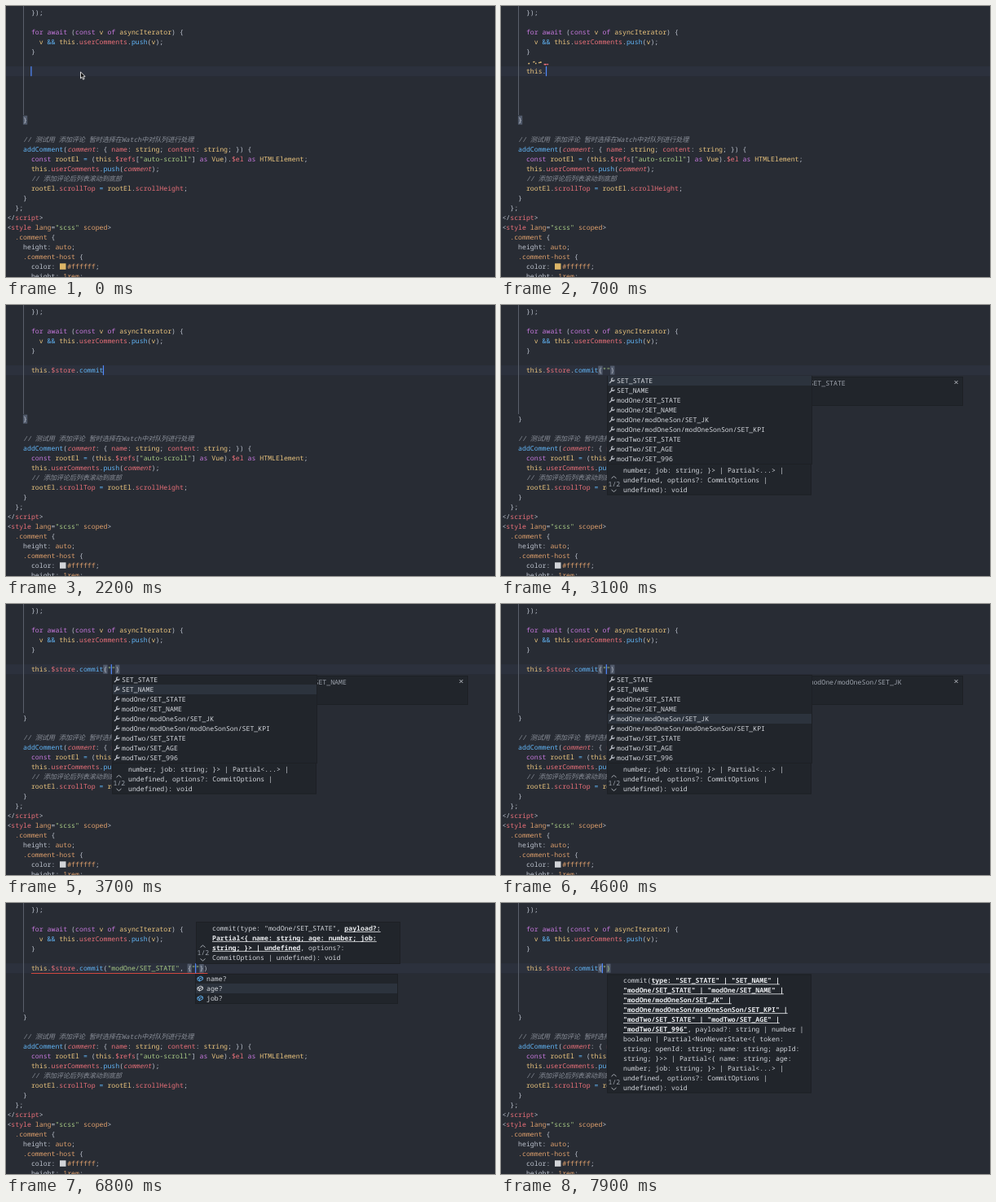
These frames come from a looping animation (600x333 px, 8 s). An HTML page with a canvas:

```html
<!DOCTYPE html>
<html lang="zh">
<head>
<meta charset="utf-8">
<style>
html, body { margin: 0; width: 100%; height: 100%; overflow: hidden; background: #282c34; }
canvas { display: block; width: 600px; height: 333px; }
</style>
</head>
<body>
<canvas id="stage" width="600" height="333"></canvas>
<script>
const g = document.getElementById('stage').getContext('2d');
const LOOP = 8000, CHAR = 4.92, WIDE = 8, LEFT = 1.4, ROW = 12;
const colX = col => LEFT + CHAR * col;
const rowY = row => 8.2 + ROW * row;

// One-letter tags used in marked-up text: `tag followed by its run of characters.
const COLORS = {
  w: '#bcc2cd', p: '#c678dd', o: '#dfa06c', y: '#ebc57e', r: '#ea7079', i: '#ea7079', b: '#61b4f5',
  g: '#a9cb85', c: '#8a8f99', n: '#d2d5db', d: '#9ca2ac', B: '#eceef1', M: '#f2f3f5'
};

const CODE = [
  [0, 6, '`w});'],
  [2, 6, '`pfor await `w(`pconst `yv `pof `yasyncIterator`w) {'],
  [3, 8, '`yv `b&& `ythis`w.`ruserComments`w.`bpush`w(`yv`w);'],
  [4, 6, '`w}'],
  [11, 4, '`w}'],
  [13, 4, '`c// 测试用 添加评论 暂时选择在Watch中对队列进行处理'],
  [14, 4, '`baddComment`w(`icomment`w: { `rname`w: `ystring`w; `rcontent`w: `ystring`w; }) {'],
  [15, 6, '`pconst `yrootEl `b= `w(`ythis`w.`r$refs`w[`g"auto-scroll"`w] `pas `yVue`w).`r$el `pas `yHTMLElement`w;'],
  [16, 6, '`ythis`w.`ruserComments`w.`bpush`w(`icomment`w);'],
  [17, 6, '`c// 添加评论后列表滚动到底部'],
  [18, 6, '`yrootEl`w.`rscrollTop `b= `yrootEl`w.`rscrollHeight`w;'],
  [19, 4, '`w}'],
  [20, 2, '`w};'],
  [21, 0, '`w</`rscript`w>'],
  [22, 0, '`w<`rstyle `olang`w=`g"scss" `oscoped`w>'],
  [23, 2, '`o.comment `w{'],
  [24, 4, '`wheight: `oauto`w;'],
  [25, 4, '`o.comment-host `w{'],
  [26, 6, '`wcolor:   `o#ffffff`w;'],
  [27, 6, '`wheight: `o1rem`w;']
];

const STORE_DOC = [
  '(property) Vue.$store: CutStore &…', '    commit: {', '        <R extends "SET_STATE" | …',
  '            ...;', '        } & { ... 6 more ... & {', '            ...;',
  '        })[R] | undefined, option…', '        <P extends Payload>(paylo…', '    };',
  '} & {', '    ...;', '} & {', '    ...;', '}'
].map(s => '`d' + s);

const TYPES = [
  'SET_STATE', 'SET_NAME', 'modOne/SET_STATE', 'modOne/SET_NAME', 'modOne/modOneSon/SET_JK',
  'modOne/modOneSon/modOneSonSon/SET_KPI', 'modTwo/SET_STATE', 'modTwo/SET_AGE', 'modTwo/SET_996'
];

const ALL_SIG = [
  '`ncommit(`Btype: "SET_STATE" | "SET_NAME" |',
  '`B"modOne/SET_STATE" | "modOne/SET_NAME" |',
  '`B"modOne/modOneSon/SET_JK" |',
  '`B"modOne/modOneSon/modOneSonSon/SET_KPI" |',
  '`B"modTwo/SET_STATE" | "modTwo/SET_AGE" |',
  '`B"modTwo/SET_996"`n, payload?: string | number |',
  '`nboolean | Partial<NonNeverState<{ token:',
  '`nstring; openId: string; name: string; appId:',
  '`nstring; }>> | Partial<{ name: string; age:',
  '`nnumber; job: string; }> | Partial<...> |',
  '`nundefined, options?: CommitOptions |',
  '`nundefined): void'
];
const stateSig = (typeTag, loadTag) => [
  `\`ncommit(\`${typeTag}type: "modOne/SET_STATE"\`n, \`${loadTag}payload?:`,
  `\`${loadTag}Partial<{ name: string; age: number; job:`,
  `\`${loadTag}string; }> | undefined\`n, options?:`,
  '`nCommitOptions | undefined): void'
];
const TYPE_SIG = stateSig('B', 'n'), LOAD_SIG = stateSig('n', 'B');

// Editing steps: [time, text, caret column within the text]
const steps = [[0, '', 0]];
const put = (time, text, caret = text.length) => steps.push([time, text, caret]);
const call = 'this.$store.commit', args = '"modOne/SET_STATE", {""}';
for (let i = 1; i <= 10; i++) put(200 + 100 * i, 'this.$stor'.slice(0, i));
put(1500, 'this.$store');
for (let i = 0; i < 4; i++) put(1800 + 100 * i, call.slice(0, 12 + i));
put(2200, call);
put(2400, call + '()', 19);
put(2600, call + '("")', 20);
put(5300, call + '("modOne/SET_STATE")', 37);
put(5700, call + '("modOne/SET_STATE",)', 38);
put(5800, call + '("modOne/SET_STATE", )', 39);
put(6100, call + '("modOne/SET_STATE", {})', 40);
put(6500, call + '("modOne/SET_STATE", {""})', 41);
for (let i = 1; i < 6; i++) put(7200 + 100 * i, `${call}(${args.slice(0, 24 - 4 * i)})`, 43 - 4 * i);
put(7800, call + '(")', 19);

const within = (t, from, to) => t >= from && t < to;

function rect(x, y, w, h, color) {
  g.fillStyle = color;
  g.fillRect(x, y, w, h);
}

function stroke(color, width, ...lines) {
  g.strokeStyle = color;
  g.lineWidth = width;
  g.beginPath();
  for (const [[x, y], ...rest] of lines) {
    g.moveTo(x, y);
    for (const p of rest) g.lineTo(...p);
  }
  g.stroke();
}

// Draws marked-up text on the character grid, centred on y.
function write(x, y, markup) {
  for (const run of markup.split('`').slice(1)) {
    const tag = run[0], text = run.slice(1), start = x;
    const style = 'ci'.includes(tag) ? 'italic 500 ' : 'BM'.includes(tag) ? 'bold ' : '500 ';
    g.font = style + '8.2px "Noto Sans Mono", "Noto Sans CJK SC", "Noto Sans CJK", monospace';
    g.fillStyle = COLORS[tag];
    for (const ch of text) {
      if (ch !== ' ') g.fillText(ch, x, y + 2.9);
      x += ch > '\u2e80' ? WIDE : CHAR;
    }
    if (tag === 'B') rect(start, y + 4, x - start, 0.8, COLORS.B);
  }
}

function panel(x, y, w, h) {
  rect(x, y, w, h, '#21252b');
  g.strokeStyle = '#1d2025';
  g.lineWidth = 1;
  g.strokeRect(x + 0.5, y + 0.5, w - 1, h - 1);
}

function cube(x, y, color) {
  stroke(color, 0.9,
    [[x - 3, y - 1], [x + 1, y - 3], [x + 3.4, y - 1.6], [x + 3.4, y + 1], [x - 0.6, y + 3], [x - 3, y + 1.6], [x - 3, y - 1], [x - 0.6, y + 0.3], [x + 3.4, y - 1.6]],
    [[x - 0.6, y + 0.3], [x - 0.6, y + 3]]);
}

function wrench(x, y) {
  stroke('#b4b8c0', 1.3, [[x - 3, y + 3], [x + 1, y - 1]]);
  g.beginPath();
  g.arc(x + 1.3, y - 1.3, 1.8, 0, 4.8);
  g.stroke();
}

function list(x, y, w, items, selected, textX, icon) {
  panel(x, y, w, items.length * ROW + 1);
  items.forEach((item, i) => {
    const cy = y + 6 + ROW * i;
    if (i === selected) rect(x + 1, cy - 6, w - 2, ROW, '#2c333d');
    icon(x + 6, cy, i === selected);
    write(textX, cy, item);
  });
}

function docs(x, w, h, lines) {
  panel(x, 88, w, h);
  lines.forEach((s, i) => write(x + 1.5, 96 + ROW * i, s));
  const cx = x + w - 8.5;
  stroke('#c3c7cf', 0.9, [[cx - 2, 93], [cx + 2, 97]], [[cx + 2, 93], [cx - 2, 97]]);
}

function signature(x, y, lines) {
  const h = 11.75 * lines.length + 5, mid = y + h - 13.5;
  panel(x, y, 251, Math.round(h));
  lines.forEach((s, i) => write(x + 20, y + 8 + 11.93 * i, s));
  write(x + 1.5, mid, '`d1/2');
  for (const d of [-1, 1]) {
    const ay = mid + 8 * d;
    stroke('#b4b8c0', 0.9, [[x + 5.5, ay - d], [x + 8.5, ay + 1.5 * d], [x + 11.5, ay - d]]);
  }
}

function bracketBox(col, row) {
  rect(colX(col) - 0.2, rowY(row) - 5.5, CHAR + 0.4, 11, '#515a6b');
}

function tokenTag(s) {
  if (s === 'this') return 'y';
  if (s[0] === '$') return 'r';
  if (s[0] === '"') return 'g';
  return /\w/.test(s) ? 'b' : 'w';
}

function pointer(x, y) {
  g.beginPath();
  for (const [dx, dy] of [[0, 0], [0, 8], [1.8, 6.3], [3.2, 9.3], [4.6, 8.6], [3.3, 5.8], [5.7, 5.6]]) g.lineTo(x + dx, y + dy);
  g.closePath();
  g.fillStyle = '#111';
  g.fill();
  g.strokeStyle = '#eee';
  g.lineWidth = 0.9;
  g.stroke();
}

// Short sparks thrown up by each key of the first word.
function sparks(t) {
  for (let k = 1; k <= 10; k++) {
    const age = (t - steps[k][0]) / 300;
    if (age < 0 || age >= 1) continue;
    for (let i = 0; i < 4; i++) {
      const seed = Math.sin(k * 12.9 + i * 78.2) * 437.5, rnd = seed - Math.floor(seed);
      const x = colX(6 + k) + (rnd - 0.6) * 24 * (0.4 + age);
      const y = 71 - (4 + 12 * rnd) * age + 6 * age * age;
      rect(x, y, 1.8 - age, 1.4, k < 5 ? COLORS.y : COLORS.r);
    }
  }
}

function popups(t) {
  if (within(t, 1000, 1500)) {
    list(80, 87, 249, ['`M$stor`ne', '`M$`nde`Mst`nr`Mo`ny'], 0, 93.5, (x, y) => cube(x + 1, y, '#c3c7cf'));
    if (t >= 1200) docs(328, 189, 192, STORE_DOC);
  }
  if (within(t, 1900, 2200))
    list(94, 87, 249, ['`Mc`nommit'], 0, 107.5, (x, y) => cube(x + 1, y, '#b18bd0'));
  if (within(t, 2400, 5300) || t >= 7800) signature(130, 87.5, ALL_SIG);
  if (within(t, 2600, 5300)) {
    const moves = [3500, 3800, 4100, 4400].filter(m => t >= m).length;
    const selected = moves - (t >= 4800) - (t >= 5000);
    docs(377, 190, 36, ['`d' + TYPES[selected]]);
    list(130, 87, 252, TYPES.map(s => '`n' + s), selected, 142, wrench);
  }
  if (within(t, 5300, 7300)) {
    signature(t < 6100 ? 214 : 233, 23, t < 5700 ? TYPE_SIG : LOAD_SIG);
    if (t >= 6500) {
      const selected = (t >= 6700) + (t >= 7050);
      list(232, 87, 249, ['`nname?', '`nage?', '`njob?'], selected, 246,
        (x, y, on) => cube(x, y, on ? '#e4e6ea' : COLORS.b));
    }
  }
}

function draw(t) {
  const [since, text, caret] = steps.findLast(s => s[0] <= t);
  const lineY = rowY(6) - 6;
  rect(0, 0, 600, 333, '#282c34');
  rect(0, lineY, 600, ROW, '#2c313d');
  rect(21, 0, 1, 134, '#5a606b');

  if (t < 2400) bracketBox(4, 11);
  else if (within(t, 6100, 7300)) {
    bracketBox(6 + text.indexOf('{'), 6);
    bracketBox(6 + text.indexOf('}'), 6);
  } else {
    bracketBox(24, 6);
    bracketBox(5 + text.length, 6);
  }

  for (const [row, col, markup] of CODE) write(colX(col), rowY(row), markup);
  rect(66, 316.3, 7.5, 7.5, t < 1000 ? '#dcb567' : '#d2d4d8');

  const tokens = text.match(/this|\$\w*|"[^"]*"?|\w+|./g) || [];
  write(colX(6), rowY(6), tokens.map(s => '`' + tokenTag(s) + s).join(''));

  if (within(t, 6100, 7300)) rect(colX(6), 86, CHAR * text.length, 1, '#d0473f');
  if (Math.floor((t - since) / 500) % 2 === 0) rect(colX(6 + caret) - 0.6, lineY, 1.2, ROW, '#528bff');

  sparks(t);
  if (t < 300) pointer(91.5, 81);
  popups(t);
}

g.textRendering = 'geometricPrecision';
function tick(now) {
  draw(now % LOOP);
  requestAnimationFrame(tick);
}
draw(0);
requestAnimationFrame(tick);
</script>
</body>
</html>
```
